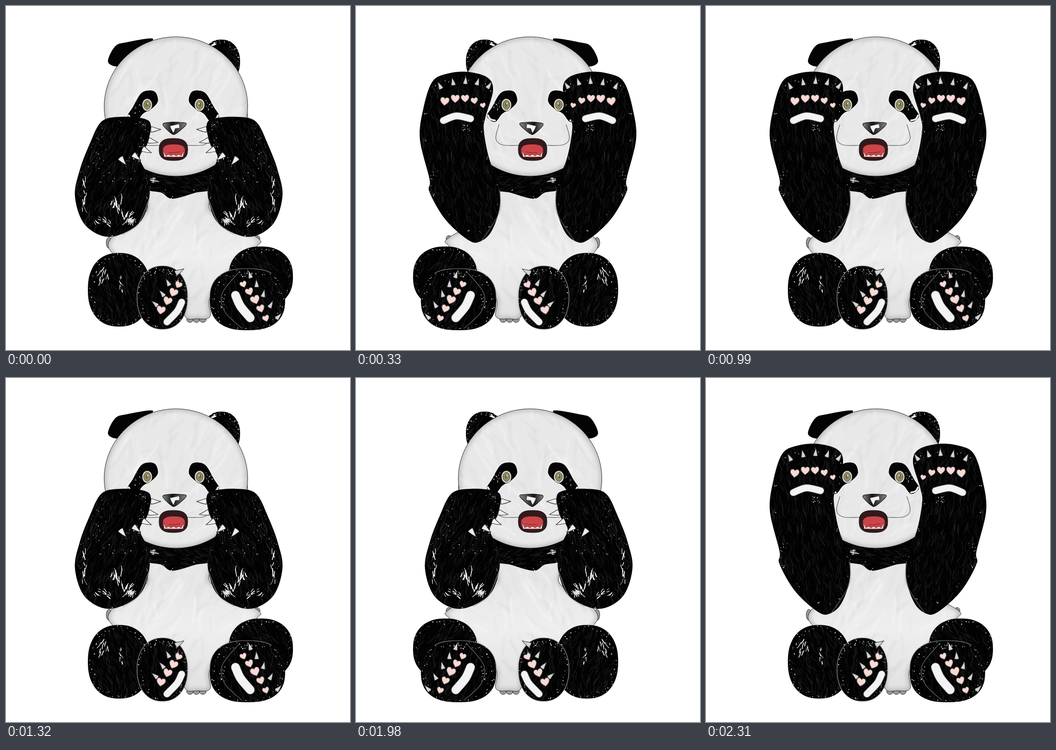
Animation, 748 px wide and 748 px high, one loop 2640 ms. Source, as an HTML page with a canvas:

```html
<!DOCTYPE html>
<html lang="en">
<head>
<meta charset="utf-8">
<title>Peekaboo panda</title>
<style>
html, body { margin: 0; width: 100%; height: 100%; overflow: hidden; background: #fff; }
canvas { display: block; width: 100vw; height: 100vh; }
</style>
</head>
<body>
<canvas id="stage" width="748" height="748"></canvas>
<script>
const SIZE = 748, STEP = 330, FACE = 364;
let g, seed = 7;

function rnd(a = 0, b = 1) {
  seed = (Math.imul(seed, 1664525) + 1013904223) >>> 0;
  return a + (b - a) * seed / 4294967296;
}

function layer(paint) {
  const c = document.createElement('canvas');
  c.width = c.height = SIZE;
  g = c.getContext('2d');
  g.lineCap = g.lineJoin = 'round';
  paint();
  return c;
}

function placed(x, y, turn, s, paint) {
  g.save();
  g.translate(x, y);
  g.rotate(turn);
  g.scale(s, s);
  paint();
  g.restore();
}

// Paints once as it is and once mirrored about the vertical at x
function twice(x, paint) {
  paint();
  g.save();
  g.transform(-1, 0, 0, 1, 2 * x, 0);
  paint();
  g.restore();
}

// Points of a superellipse; a higher power gives squarer corners
function egg(x, y, rx, ry, power = 2) {
  const p = [], bend = v => Math.sign(v) * Math.abs(v) ** (2 / power);
  for (let i = 0; i < 32; i++) {
    const a = i * Math.PI / 16;
    p.push(x + rx * bend(Math.cos(a)), y + ry * bend(Math.sin(a)));
  }
  return p;
}

// Smooth curve through a flat list of points
function curve(p, open) {
  const n = p.length / 2, path = new Path2D();
  const at = i => {
    i = open ? Math.max(0, Math.min(n - 1, i)) : (i + n) % n;
    return [p[2 * i], p[2 * i + 1]];
  };
  path.moveTo(p[0], p[1]);
  for (let i = 0; i < (open ? n - 1 : n); i++) {
    const [a, b, c, d] = [at(i - 1), at(i), at(i + 1), at(i + 2)];
    path.bezierCurveTo(b[0] + (c[0] - a[0]) / 6, b[1] + (c[1] - a[1]) / 6,
      c[0] - (d[0] - b[0]) / 6, c[1] - (d[1] - b[1]) / 6, c[0], c[1]);
  }
  if (!open) path.closePath();
  return path;
}

// Calls item(x, y, i) at n even steps of a quadratic arc
function row(n, [x0, y0, x1, y1, x2, y2], item) {
  const mix = (a, b, c, t) => (1 - t) ** 2 * a + 2 * t * (1 - t) * b + t * t * c;
  for (let i = 0; i < n; i++) {
    const t = i / (n - 1);
    item(mix(x0, x1, x2, t), mix(y0, y1, y2, t), i);
  }
}

function fill(path, color, line, width = 1) {
  g.fillStyle = color;
  g.fill(path);
  if (line) stroke(path, line, width);
}

function stroke(path, color, width = 1) {
  g.strokeStyle = color;
  g.lineWidth = width;
  g.stroke(path);
}

function bounds(p) {
  const xs = p.filter((v, i) => i % 2 === 0), ys = p.filter((v, i) => i % 2);
  return [Math.min(...xs), Math.min(...ys), Math.max(...xs), Math.max(...ys)];
}

function hairs([x0, y0, x1, y1], n, angle, spread, len, tone, width) {
  for (let i = 0; i < n; i++) {
    const x = rnd(x0, x1), y = rnd(y0, y1), l = rnd(len * .4, len);
    const a = angle + rnd(-spread, spread), b = a + rnd(-.4, .4);
    const path = new Path2D();
    path.moveTo(x, y);
    path.quadraticCurveTo(x + Math.cos(a) * l / 2, y + Math.sin(a) * l / 2,
      x + Math.cos(b) * l, y + Math.sin(b) * l);
    stroke(path, tone(), rnd(width * .4, width));
  }
}

const darkTone = () => `rgba(60,60,60,${rnd(.1, .45)})`;
const paleTone = () => rnd() < .6 ? `rgba(255,255,255,${rnd(.1, .4)})` : `rgba(190,190,190,${rnd(.08, .2)})`;

function specks(x, y, w, h, n) {
  g.fillStyle = '#fff';
  for (let i = 0; i < n; i++) g.fillRect(x + rnd(-w, w) / 2, y + rnd(-h, h) / 2, rnd(.6, 2.2), rnd(.6, 2.2));
}

function shine(x, y, w, h, n, angle, len) {
  hairs([x - w / 2, y - h / 2, x + w / 2, y + h / 2], n, angle, .2, len, () => '#fff', 2);
}

function furry(p, angle = 1.4) {
  const path = curve(p), box = bounds(p), [x0, y0, x1, y1] = box;
  fill(path, '#020202');
  g.save();
  g.clip(path);
  hairs(box, (x1 - x0) * (y1 - y0) / 75, angle, .3, 24, darkTone, 1.8);
  for (let i = 0; i < p.length; i += 2) {
    const f = rnd(.03, .14);
    specks(p[i] + ((x0 + x1) / 2 - p[i]) * f, p[i + 1] + ((y0 + y1) / 2 - p[i + 1]) * f, 10, 10, 2);
  }
  g.restore();
}

function pale(p, shade, angle) {
  const path = curve(p);
  fill(path, shade);
  g.save();
  g.clip(path);
  g.filter = 'blur(2px)';
  hairs(bounds(p), 140, angle, .5, 70, paleTone, 6);
  g.filter = 'blur(5px)';
  stroke(path, 'rgba(120,120,120,.5)', 7);
  g.restore();
  stroke(path, '#222', 1);
}

function heart(x, y, s, turn) {
  placed(x, y, turn, s, () =>
    fill(new Path2D('M0 9C-5 5-10 1-9-4C-8-9-2-9 0-5C2-9 8-9 9-4C10 1 5 5 0 9Z'), '#fad8d3', '#666'));
}

function claw(x, y, turn, s = .9, color = '#d3d3d3') {
  placed(x, y, turn, s, () => fill(new Path2D('M0-11Q4-2 6 7Q0 9-5 7Q-2-2 0-11Z'), color, '#333'));
}

function sole(p, width) {
  const path = curve(p, true);
  stroke(path, '#777', width + 2);
  stroke(path, '#f3f3f3', width);
}

function torso() {
  const light = g.createLinearGradient(0, 400, 0, 690);
  light.addColorStop(0, '#e4e4e4');
  light.addColorStop(.5, '#eeeeee');
  light.addColorStop(1, '#e0e0e0');
  for (let i = 0; i < 3; i++) fill(curve(egg(400 + i * 14, 682, 7, 6)), '#999', '#222');
  fill(curve(egg(224, 515, 6, 12)), '#999', '#222');
  fill(curve(egg(546, 506, 6, 7)), '#999', '#222');
  pale([300, 390, 306, 445, 231, 502, 232, 538, 310, 590, 383, 610, 389, 674, 416, 680, 444, 675,
    445, 630, 505, 560, 546, 522, 545, 503, 445, 445, 445, 390], light, -1);
  furry([298, 350, 375, 352, 452, 345, 447, 396, 412, 406, 362, 419, 338, 406, 304, 396], .3);
  shine(320, 379, 18, 12, 8, .4, 9);
}

function legs() {
  furry(egg(246, 617, 68, 80, 2.3), 1.2);
  shine(213, 583, 18, 32, 11, 1.9, 14);
  shine(250, 595, 8, 45, 7, 1.4, 9);
  const foot = egg(340, 634, 55, 69, 2.2);
  furry(foot, 1.3);
  stroke(curve(foot), '#999', 1.2);
  specks(335, 578, 55, 12, 20);
  claw(376, 577, 1.1, 1.1);
  row(3, [352, 602, 341, 627, 324, 648], (x, y, i) => claw(x, y, -.45 - i * .2));
  row(4, [375, 606, 360, 630, 337, 661], (x, y, i) => heart(x, y, i ? 1.05 : .85, .5 - i * .1));
  sole([350, 687, 372, 664, 382, 644], 14);

  furry(egg(554, 589, 70, 66, 2.3), .9);
  const paw = egg(525, 638, 82, 67, 2.5);
  furry(paw, 1.2);
  stroke(curve(paw.slice(32, 56), true), '#888', 1.2);
  stroke(curve([508, 577, 470, 625, 476, 665, 512, 700], true), '#777', 1.2);
  specks(525, 582, 50, 14, 16);
  specks(468, 630, 16, 70, 12);
  row(5, [530, 585, 558, 622, 592, 675], (x, y, i) => claw(x, y, -.3 + i * .27));
  row(5, [516, 605, 543, 635, 565, 679], (x, y, i) => heart(x, y, 1.1 - .15 * Math.abs(i - 2), -.35));
  sole([499, 629, 510, 653, 531, 678], 18);
}

function eye() {
  const patch = curve([398, 207, 403, 188, 418, 184, 435, 191, 452, 220, 463, 240, 446, 252, 430, 234, 410, 222]);
  stroke(patch, '#fafafa', 4);
  fill(patch, '#050505', '#222', .8);
  stroke(curve([461, 238, 456, 246, 446, 249], true), '#eee', 4);
  specks(441, 215, 16, 36, 12);
  fill(curve(egg(421, 215, 11, 13.5)), '#dedcd4', '#222');
  fill(curve(egg(421, 215, 7.5, 10)), '#8e8b62', '#45432f');
  fill(curve(egg(422, 214, 2, 5)), '#66643c');
  fill(curve(egg(420, 212, 1.3, 2)), '#e8e6d8');
}

function mouth() {
  fill(curve(egg(FACE, 312, 31, 24, 2.7)), '#33191c', '#111');
  fill(curve(egg(FACE + 1, 315, 24, 14, 2.7)), '#cb4548');
  stroke(curve([354, 319, 366, 319, 379, 317], true), '#6d1d22');
  const teeth = new Path2D();
  for (let i = 0; i <= 8; i++) teeth.lineTo(342 + i * 5.6, i % 8 ? 323 + 3 * (i % 2) : 314);
  teeth.lineTo(385, 328);
  teeth.lineTo(344, 328);
  teeth.closePath();
  fill(teeth, '#f5f1ee', '#5a2526', .7);
}

function head() {
  fill(curve([222, 122, 237, 88, 262, 79, 320, 72, 272, 108, 248, 131]), '#040404');
  furry(egg(468, 121, 41, 48, 2.2), .7);
  shine(457, 81, 22, 6, 8, 2.5, 8);
  stroke(curve([505, 162, 519, 190, 526, 245], true), '#555', 1.2);
  pale(egg(369.5, 218.5, 156, 151.5), '#e8e8e8', -1.1);

  twice(FACE, () => {
    eye();
    stroke(curve([394, 303, 430, 302, 444, 288, 437, 258], true), '#555', 1.2);
  });

  const nose = g.createLinearGradient(341, 0, 392, 0);
  nose.addColorStop(0, '#888');
  nose.addColorStop(.4, '#111');
  nose.addColorStop(1, '#888');
  fill(curve([341, 258, 354, 253, 378, 253, 392, 257, 369, 278, 358, 276]), nose, '#111', 1.2);
  fill(new Path2D('M357 261L376 257L377 265L368 266L364 276L359 267Z'), '#f4f4f4');
  mouth();
}

function lowArm() {
  furry([208, 251, 250, 241, 300, 245, 315, 260, 307, 300, 291, 330, 309, 372, 311, 420, 288, 474, 225, 502,
    172, 476, 150, 415, 160, 358, 182, 300], 1.9);
  stroke(curve([311, 420, 288, 474, 255, 497], true), 'rgba(170,170,170,.6)', 2);
  shine(241, 428, 24, 40, 16, 1.5, 20);
  shine(272, 456, 24, 20, 20, 2.1, 16);
  shine(171, 405, 10, 70, 14, 1.5, 15);
  shine(207, 468, 34, 24, 14, .7, 11);
  specks(230, 355, 110, 60, 26);
  specks(205, 305, 25, 60, 9);
  specks(292, 290, 25, 70, 10);
  row(5, [324, 268, 321, 325, 254, 336], (x, y, i) => claw(x, y, 1.6 + i * .22, 1.15, '#eee'));
}

function highArm() {
  furry([165, 166, 195, 148, 240, 143, 285, 155, 298, 183, 282, 240, 278, 270, 289, 330, 311, 390, 312, 440,
    295, 489, 272, 511, 246, 510, 195, 465, 160, 405, 160, 377, 139, 290, 146, 225], 1.45);
  stroke(curve([312, 400, 311, 450, 272, 512], true), 'rgba(140,140,140,.5)', 2);
  specks(237, 262, 24, 16, 14);
  specks(168, 388, 18, 60, 8);
  row(5, [182, 174, 240, 152, 289, 173], (x, y, i) => claw(x, y, -.45 + i * .27));
  row(5, [193, 207, 240, 190, 276, 216], (x, y, i) => heart(x, y, 1.05 - .025 * i * i, .1 - i * .08));
  sole([190, 249, 218, 239, 249, 245], 14);
}

const body = layer(() => { torso(); legs(); head(); });
const low = layer(lowArm), high = layer(highArm);
const out = document.getElementById('stage').getContext('2d');

function put(img, flipAt) {
  out.setTransform(flipAt ? -1 : 1, 0, 0, 1, flipAt || 0, 0);
  out.drawImage(img, 0, 0);
}

// Arms toggle on every beat; the body turns round on every second one
function draw(ms) {
  const beat = Math.floor(ms / STEP) % 4, up = beat % 2 === 1;
  const arm = up ? high : low;
  out.setTransform(1, 0, 0, 1, 0, 0);
  out.fillStyle = '#fff';
  out.fillRect(0, 0, SIZE, SIZE);
  put(body, beat === 1 || beat === 2 ? SIZE : 0);
  put(arm);
  put(arm, up ? SIZE : 751);
}

let start;
function tick(now) {
  start ??= now;
  draw(now - start);
  requestAnimationFrame(tick);
}
draw(0);
requestAnimationFrame(tick);
</script>
</body>
</html>
```
